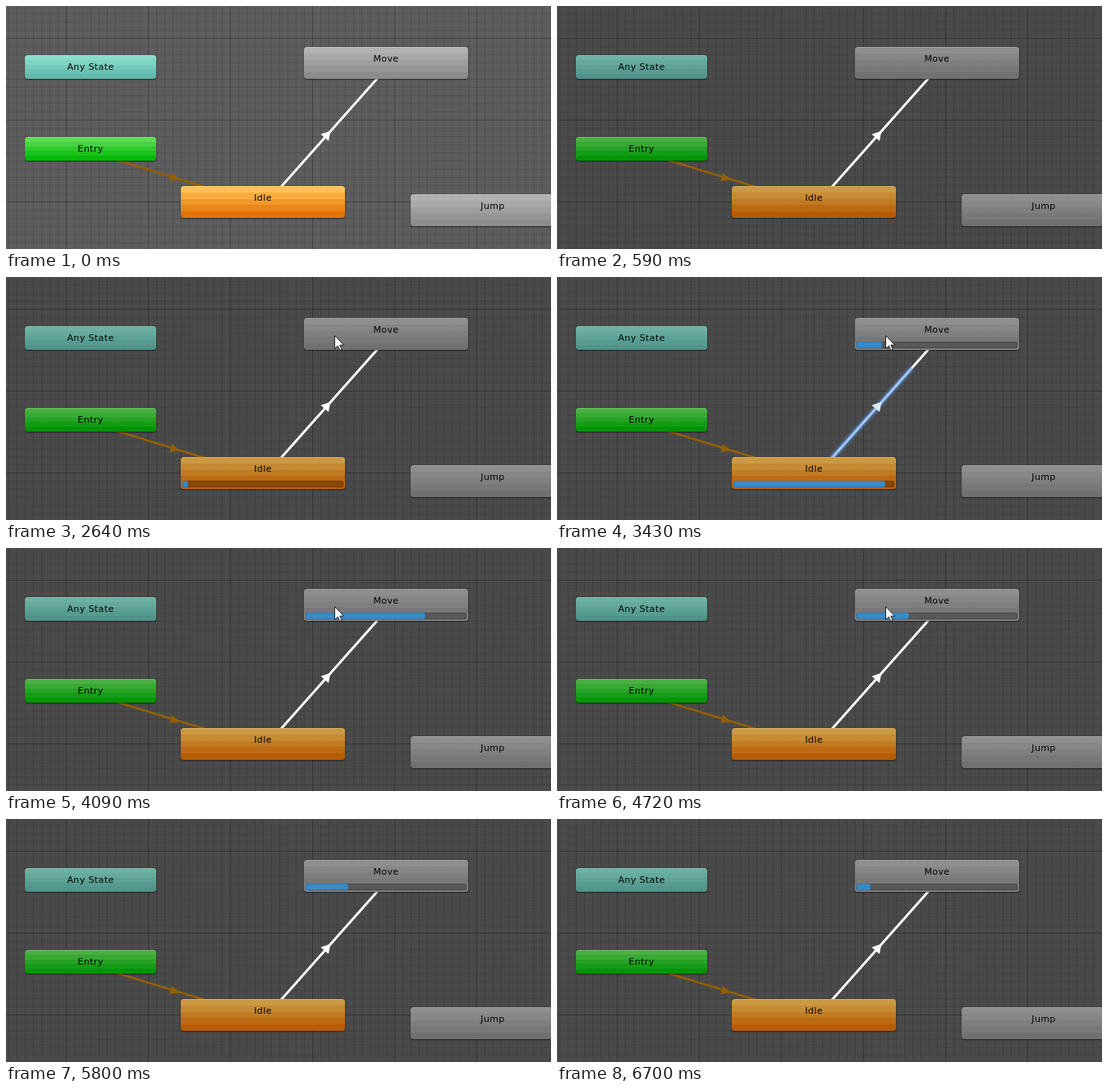
Write an HTML page that moves like this. It is 664x297 px and loops after 6800 ms.

```html
<!DOCTYPE html>
<html lang="en">
<head>
<meta charset="utf-8">
<title>State machine</title>
<style>
html, body { margin: 0; width: 100%; height: 100%; overflow: hidden; }
#stage {
  --minor: rgba(0,0,0,.12);
  --major: rgba(0,0,0,.2);
  --shade: transparent;
  position: absolute; left: 0; top: 0; width: 664px; height: 297px; overflow: hidden;
  background-color: #5d5d5d;
  background-image:
    linear-gradient(90deg, var(--major) 1px, transparent 1px),
    linear-gradient(var(--major) 1px, transparent 1px),
    linear-gradient(90deg, var(--minor) 1px, transparent 1px),
    linear-gradient(var(--minor) 1px, transparent 1px);
  background-size: 100px 100px, 100px 100px, 10px 10px, 10px 10px;
  background-position: 73px 0, 0 39px, 3px 0, 0 9px;
}
#stage.play { --shade: rgba(0,0,0,.2); background-color: #4a4a4a; }
svg { position: absolute; left: 0; top: 0; }
.node {
  position: absolute; border-radius: 4px;
  background: linear-gradient(var(--shade), var(--shade)), var(--fill);
  box-shadow: 0 1px 2px rgba(0,0,0,.5), inset 0 1px rgba(255,255,255,.18);
  font: 11px/13px "DejaVu Sans", Verdana, sans-serif;
  letter-spacing: .4px; text-align: center; color: #000;
}
.node span { position: absolute; left: 0; right: 0; top: 8px; }
.bar {
  position: absolute; left: 2px; bottom: 2px; width: 196px; height: 8px;
  box-sizing: border-box; border: 1px solid; border-radius: 2px; visibility: hidden;
}
.bar::after {
  content: ""; position: absolute; inset: 0 -3px -3px;
  border: 1px solid var(--rim); border-top: 0; border-radius: 0 0 4px 4px;
}
.bar i {
  position: absolute; left: -1px; top: -1px; height: 8px;
  box-sizing: border-box; border: 1px solid #3179b3; border-radius: 2px; background: #398ac9;
}
#idle .bar { background: #8b4706; border-color: #733a04; --rim: #cc6d18; }
#move .bar { background: #585858; border-color: #484848; --rim: #8c8c8c; }
</style>
</head>
<body>
<div id="stage">
  <svg width="664" height="297">
    <defs>
      <filter id="blur" filterUnits="userSpaceOnUse" x="300" y="60" width="190" height="190">
        <feGaussianBlur stdDeviation="1.4"/>
      </filter>
    </defs>
    <path d="M134 188L242 221" stroke="#925f06" stroke-width="2.7"/>
    <path d="M212.5 212.2L202 204L199.3 214Z" fill="#925f06"/>
    <path d="M334 222.3L454 86.7" stroke="#fff" stroke-width="2.9"/>
    <g id="flow">
      <path class="run" stroke="#5489cf" stroke-width="6" opacity=".8" filter="url(#blur)"/>
      <path class="run" stroke="#a3c8f5" stroke-width="2.6"/>
    </g>
    <path id="head" d="M395.3 152.8L393 165L383.4 156.8Z" fill="#fff"/>
  </svg>
  <svg id="cursor" width="14" height="21">
    <path d="M.5 .7V16.6L4.2 13.2L6.8 18.6L9.2 17.5L6.7 12.2H11.6Z" fill="#fff" stroke="#111" stroke-width=".9"/>
  </svg>
</div>
<script>
const LOOP = 6800, PLAY = 590, RUN = 2640;
const STEP = 130.3, FIRST = 2895;
const FLOW = 3260, FLOW_TIME = 212;        // transition from Idle to Move
const CLIP = 1113, BAR = 196;              // one pass of the Move bar, bar width
// key points of the pointer: time, x, y
const POINTER = [[1900, 400, 61], [2020, 400, 71], [4870, 400, 71],
  [5230, 558, 253], [5380, 639, 267], [5650, 635, 284]];

const $ = s => document.querySelector(s);
const stage = $('#stage'), cursor = $('#cursor');
const show = (el, on) => { el.style.visibility = on ? 'visible' : 'hidden'; };
const lerp = (a, b, k) => a + (b - a) * k;

function bands(top, bottom, n = 5) {
  const stops = Array.from({ length: n }, (_, i) =>
    `color-mix(in srgb, ${bottom} ${i / (n - 1) * 100}%, ${top}) ${i / n * 100}% ${(i + 1) / n * 100}%`);
  return `linear-gradient(${stops})`;
}

function addNode(id, label, x, y, w, h, top, bottom) {
  const el = document.createElement('div');
  el.className = 'node';
  el.id = id;
  el.style.cssText = `left:${x}px;top:${y}px;width:${w}px;height:${h}px`;
  el.style.setProperty('--fill', bands(top, bottom));
  el.innerHTML = `<span>${label}</span><div class="bar"><i></i></div>`;
  stage.insertBefore(el, cursor);
}

addNode('any', 'Any State', 23, 60, 160, 29, '#87ddcb', '#63b8ad');
addNode('entry', 'Entry', 23, 160, 160, 29, '#5cdc54', '#04ba08');
addNode('move', 'Move', 363, 50, 200, 39, '#b1b1b1', '#8d8d8d');
addNode('idle', 'Idle', 213, 220, 200, 39, '#fec052', '#e47305');
addNode('jump', 'Jump', 493, 230, 200, 39, '#b1b1b1', '#8d8d8d');

function setBar(id, on, part) {
  const bar = $(`#${id} .bar`);
  show(bar, on);
  bar.firstChild.style.width = part * BAR + 'px';
}

function pointerAt(t) {
  const i = POINTER.findIndex(p => p[0] > t);
  if (i < 0) return POINTER.at(-1).slice(1);
  const a = POINTER[Math.max(i - 1, 0)], b = POINTER[i];
  const k = Math.max(0, (t - a[0]) / (b[0] - a[0] || 1));
  return [lerp(a[1], b[1], k), lerp(a[2], b[2], k)];
}

function draw(time) {
  const held = FIRST + Math.floor((time - FIRST) / STEP) * STEP + 20;
  const t = time < FIRST ? time : held;

  stage.classList.toggle('play', time >= PLAY);

  const [x, y] = pointerAt(t);
  show(cursor, time >= POINTER[0][0] && t < 5770);
  cursor.style.transform = `translate(${Math.round(x)}px,${Math.round(y)}px)`;

  const k = (t - FLOW) / FLOW_TIME;
  setBar('idle', time >= RUN && k < 1, time < FIRST ? .035 : lerp(.4, .94, (t - FIRST) / 535));
  setBar('move', k > 0, Math.max(0, t - FLOW) % CLIP / CLIP);

  const flowing = k > 0 && k < 1;
  show($('#flow'), flowing);
  const path = `M334 222.3L${lerp(336, 452, k)} ${lerp(220, 89, k)}`;
  document.querySelectorAll('.run').forEach(p => p.setAttribute('d', path));
  $('#head').setAttribute('fill', flowing && k > .5 ? '#dcedff' : '#fff');
}

function frame() {
  draw(performance.now() % LOOP);
  requestAnimationFrame(frame);
}
frame();
</script>
</body>
</html>
```
